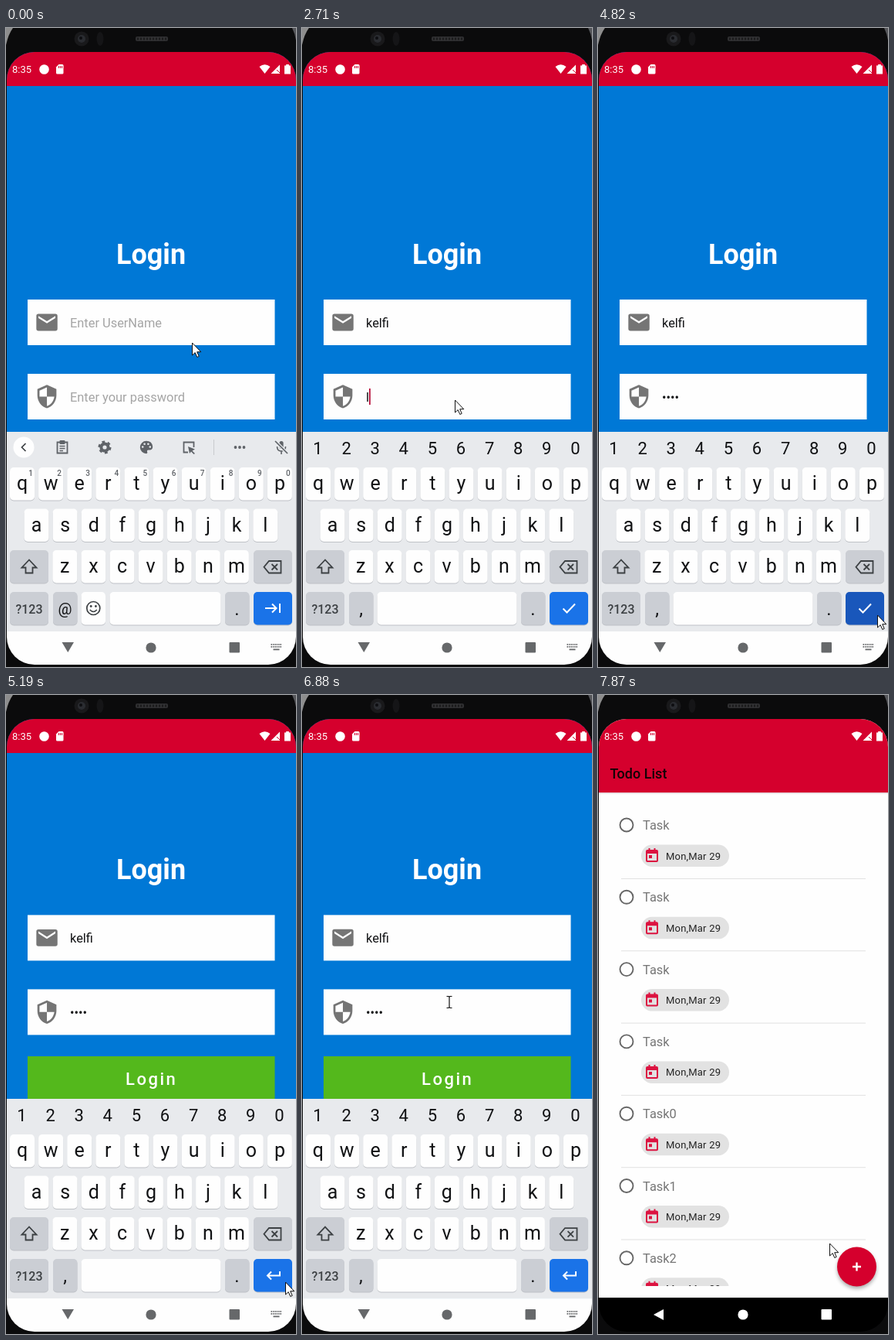
These frames come from a looping animation (376 by 826 pixels, 8000 ms). An HTML page:

```html
<!DOCTYPE html>
<html lang="en">
<head>
<meta charset="utf-8">
<title>Login to todo list</title>
<style>
html, body { margin: 0; width: 100%; height: 100%; overflow: hidden; background: #0b0b0c; }
svg { display: block; font-family: Roboto, sans-serif; }
text { white-space: pre; }
</style>
</head>
<body>
<svg id="stage" width="376" height="826" viewBox="0 0 376 826"></svg>
<script>
const LOOP = 8000, RED = '#d5002d', INK = '#111214', DARK = '#3c4043', GREY = '#5f6368';
const USER = 'kelfi';
const stage = document.getElementById('stage');
const pen = document.createElement('canvas').getContext('2d');

// Value of the last [time, value] step that has begun.
const at = (t, steps) => steps.reduce((v, s) => t >= s[0] ? s[1] : v, steps[0][1]);

const rect = (x, y, w, h, fill, r = 0) =>
  `<rect x="${x}" y="${y}" width="${w}" height="${h}" rx="${r}" fill="${fill}"/>`;
const dot = (x, y, r, fill) => `<circle cx="${x}" cy="${y}" r="${r}" fill="${fill}"/>`;
const ring = (x, y, r, color, w, extra = '') =>
  `<circle cx="${x}" cy="${y}" r="${r}" fill="none" stroke="${color}" stroke-width="${w}" ${extra}/>`;
const text = (x, y, str, size, fill = INK, extra = '') =>
  `<text x="${x}" y="${y}" font-size="${size}" fill="${fill}" ${extra}>${str}</text>`;
const mid = (x, y, str, size, fill = INK, extra = '') =>
  text(x, y, str, size, fill, `text-anchor="middle" ${extra}`);
const fill = (d, color, extra = '') => `<path d="${d}" fill="${color}" ${extra}/>`;
const line = (d, color = INK, w = 2) =>
  `<path d="${d}" fill="none" stroke="${color}" stroke-width="${w}"/>`;
const move = (x, y, s, body) => `<g transform="translate(${x} ${y}) scale(${s})">${body}</g>`;
const zoom = (s, body, alpha = 1) =>
  `<g opacity="${alpha}" transform="translate(188 427) scale(${s}) translate(-188 -427)">${body}</g>`;

const MAIL = 'M20 4H4a2 2 0 0 0-2 2v12a2 2 0 0 0 2 2h16a2 2 0 0 0 2-2V6a2 2 0 0 0-2-2zm0 4l-8 5-8-5V6l8 5 8-5z';
const SHIELD = 'M12 1L3 5v6c0 5.55 3.84 10.74 9 12 5.16-1.26 9-6.45 9-12V5zm0 11h7c-.53 4.12-3.28 7.8-7 8.94V12H5V6.3l7-3.1z';
const PALETTE = 'M0-8.2a8.2 8.2 0 0 0 0 16.4q2-.4 1-2.4-.6-2.2 1.4-2.2H4.2Q8.2 3.4 8.2-1 7.2-8.2 0-8.2z';

function body() {
  let grille = '';
  for (let x = 170; x < 209; x += 4) grille += rect(x, 12.5, 2, 3, '#1b1b1c');
  return rect(0, 0, 376, 826, '#0b0b0c') +
    fill('M0 0H9Q3 8 0 22z', '#8d8d8d') + fill('M376 0H371Q375 8 376 16z', '#55565a') +
    dot(98, 14, 9.5, '#19191b') + dot(98, 14, 5, '#2a2c31') + dot(97, 13, 2, '#0d0e11') +
    '<ellipse cx="122" cy="14" rx="4.5" ry="9" fill="#151517"/>' +
    rect(168, 11, 42, 6, '#303032', 2) + grille;
}

function statusIcons() {
  return text(8, 58, '8:35', 13, '#fff') + dot(49.5, 53.5, 6.3, '#fff') +
    fill('M68.5 47H73q1.5 0 1.5 1.5V58q0 1.5-1.5 1.5H66.5q-1.5 0-1.5-1.5V50.5z', '#fff') +
    line('M68.5 49v3M70.5 49v3M72.5 49v3', RED, 1) +
    fill('M328.5 50Q335.5 44.5 342.5 50L335.5 59z', '#fff') +
    fill('M355 47.5V59H343.5z', '#fff') + line('M351 54l4 4', RED, 1) +
    fill('M361 48.5h2.2V47h3.6v1.5H369V59.5h-8z', '#fff');
}

function field(y, icon, value, hint, showCaret, underlined = 0) {
  pen.font = '16.4px Roboto, sans-serif';
  const end = 83 + pen.measureText(value).width, baseline = y + 36;
  const marked = `<tspan text-decoration="underline">${value.slice(0, underlined)}</tspan>`;
  return rect(28, y, 320.5, 59, '#fefefe') +
    move(36.6, y + 13, 1.37, fill(icon, '#757575', 'fill-rule="evenodd"')) +
    (value ? text(83, baseline, (underlined ? marked : '') + value.slice(underlined), 16.4)
           : text(83, baseline, hint, 16.4, '#a5a5a5')) +
    (showCaret ? rect(end, y + 19, 1.8, 21, '#b8123c') : '');
}

const suggested = t => at(t, [[0, 0], [250, 1], [510, 2], [660, 3], [780, 4], [1290, 5]]);

function login(t) {
  const up = t >= 5190 ? 66.6 : 0;
  const user = USER.slice(0, at(t, [[0, 0], [120, 1], [250, 2], [370, 3], [510, 4], [1040, 5]]));
  const pass = at(t, [[0, ''], [2710, 'l'], [2860, '•o'], [2980, '••n'], [3100, '•••a'], [4580, '••••']]);
  const userCaret = at(t, [[0, 0], [120, 1], [1720, 0]]);
  const passCaret = at(t, [[0, 0], [2090, 1], [3630, 0], [4190, 1], [4700, 0]]);
  return rect(1, 31, 375, 750, '#0078d6') + rect(1, 31, 375, 44, RED) +
    `<g transform="translate(0 ${-up})">` +
    mid(188, 304.5, 'Login', 36, '#fff', 'font-weight="700"') +
    field(351, MAIL, user, 'Enter UserName', userCaret, t < 2090 ? suggested(t) : 0) +
    field(447, SHIELD, pass, 'Enter your password', passCaret) +
    rect(28, 533.6, 320.5, 60, '#54b81c') +
    text(155, 570.5, 'Login', 22, '#fff', 'font-weight="500" letter-spacing="2.5"') + '</g>' +
    keyboard(t) + rect(1, 780, 375, 43, '#fefefe');
}

function key(x, y, w, color, label = '') {
  return rect(x, y + 1, w, 42.5, '#bfc2c7', 5) + rect(x, y, w, 42.5, color, 5) + label;
}

function toolbar(t) {
  const open = t < 250;
  let out = dot(23, 542, 13.5, '#fefefe') +
    line(open ? 'M25.5 537l-5 5 5 5' : 'M20.5 537l5 5-5 5', DARK, 1.7);
  out += move(357, 542, 1, rect(-2.6, -8, 5.2, 10, GREY, 2.6) +
    line('M-5.5-1q0 6 5.5 6t5.5-6M0 5v4', GREY, 1.6) +
    line('M-8-8L8 8', '#e8eaed', 4) + line('M-8-8L8 8', GREY, 1.7));
  if (open) {
    out += move(73, 542, 1, line('M-6.5-6.5h13v14h-13z', GREY, 1.8) + rect(-3.5, -9, 7, 5, GREY, 1) +
      line('M-3.5-1.5h7M-3.5 1.5h7M-3.5 4.5h4.5', GREY, 1.4));
    out += move(128, 542, 1, ring(0, 0, 4.6, GREY, 4) + ring(0, 0, 7.3, GREY, 2.4, 'stroke-dasharray="3.82"'));
    out += move(182, 542, 1, fill(PALETTE, GREY) +
      [[-4.8, -.5], [-2.4, -4.3], [2.4, -4.3], [4.8, -.5]].map(p => dot(...p, 1.3, '#e8eaed')).join(''));
    out += move(237, 542, 1, line('M-1 6.5H-6.5V-6.5H6.5V0', GREY, 1.8) +
      fill('M-1-1L8 2.5 4.5 4.5 8 8 6.5 9 3 5.5 1 8z', GREY));
    out += rect(269, 532, 1, 20, '#c8cacd') + [297.5, 303, 308.5].map(x => dot(x, 542, 1.9, GREY)).join('');
  } else {
    out += mid(83, 548, USER.slice(0, suggested(t)), 16, '#4a4d51') +
      mid(187, 537.5, USER + 'rona27', 14.5, DARK, 'font-weight="500"') +
      mid(187, 553, '@qovel.co', 11, '#4a4d51') +
      rect(132, 531, 1, 22, '#c8cacd') + rect(242, 531, 1, 22, '#c8cacd');
  }
  return out;
}

function keyboard(t) {
  const secret = t >= 2210, pitch = 37.1, soft = '#cbced4', white = '#fefefe';
  let out = rect(1, 522, 375, 258, '#e8eaed');
  const row = (letters, x, y) => [...letters].forEach((c, i) => {
    const cx = x + i * pitch;
    out += key(cx - 16, y, 32, white, mid(cx, y + 29, c, 25));
  });
  if (!secret) out += toolbar(t);
  row('qwertyuiop', 21, 568);
  row('asdfghjkl', 39.5, 621.5);
  row('zxcvbnm', 76.3, 675);
  [...'1234567890'].forEach((d, i) => {
    out += secret ? mid(20.5 + i * pitch, 551, d, 22)
      : mid(32 + i * pitch, 579, d, 10, GREY, 'font-weight="500"');
  });
  out += key(5, 675, 50, soft, line('M30 687.5l-9.5 10h5v7h9v-7h5z', DARK, 1.8)) +
    key(321, 675, 50, soft, line('M341 689h15.5v15.5H341l-6.5-7.75zM344.5 693l7.5 7.5M352 693l-7.5 7.5', DARK, 1.8)) +
    key(5, 729, 50, soft, mid(30, 756.5, '?123', 16, DARK, 'font-weight="500"')) +
    key(61, 729, 31.5, soft, secret ? mid(76.5, 759, ',', 24) : mid(76.5, 758, '@', 20));
  if (secret) out += key(97.5, 729, 181, white);
  else out += key(97.5, 729, 31.5, white, ring(113.3, 750, 8.5, DARK, 1.7) +
      dot(110.2, 747.5, 1.4, DARK) + dot(116.4, 747.5, 1.4, DARK) +
      line('M108.8 752q4.5 5 9 0', DARK, 1.6)) + key(134.5, 729, 144, white);
  const action = !secret ? 'M336 750h14M345 744.5l5.5 5.5-5.5 5.5M355 744v12'
    : t < 5190 ? 'M338.5 750.5l5 5 10.5-11' : 'M355 745v5.5H339M344 745.5l-5 5 5 5';
  out += key(284, 729, 31.5, soft, mid(299.5, 759, '.', 24)) +
    key(321, 729, 50, t >= 4820 && t < 5190 ? '#1957bb' : '#1a73e8', line(action, '#fff', 2));
  return out;
}

function navIcons(t) {
  const dark = t >= 7240, c = dark ? '#fff' : '#66686a';
  let out = fill(dark ? 'M85 794v14l-13-7z' : 'M72.5 794h15.5l-7.75 13z', c) +
    dot(188, 801, 6.6, c) + rect(289.5, 794, 13.5, 13.5, c, 1);
  if (!dark) {
    for (let i = 0; i < 12; i++) out += rect(343.5 + i % 6 * 2.4, 796 + (i / 6 | 0) * 3, 1.5, 1.8, c);
    out += rect(346.5, 802.5, 8, 1.8, c);
  }
  return out;
}

function task(name, i) {
  return move(0, i * 93.3, 1, ring(37, 168, 8.5, '#666', 1.9) + text(58, 174, name, 16.4, '#757575') +
    rect(56, 193.5, 114, 28.5, '#e2e2e2', 14.25) +
    fill('M64 200h1.5v-2h2v2h5v-2h2v2H76q2 0 2 2v12q0 2-2 2H64q-2 0-2-2V202q0-2 2-2zM64 205v9h12v-9zM66 207h4v4h-4z',
      '#dc1340', 'fill-rule="evenodd"') +
    text(88, 212.5, 'Mon,Mar 29', 13, '#222', 'letter-spacing=".2"') + rect(30, 237, 317, 1, '#e2e2e2'));
}

function todo(t) {
  const tasks = ['Task', 'Task', 'Task', 'Task', 'Task0', 'Task1', 'Task2'];
  return rect(1, 31, 375, 748, '#fefefe') + rect(1, 126, 375, 1.5, '#e4d5d8') + rect(1, 31, 375, 95, RED) +
    text(15.5, 108, 'Todo List', 18, '#120306', 'font-weight="500"') +
    (t >= 7240 ? `<g clip-path="url(#list)">${tasks.map(task).join('')}</g>` : '') +
    '<circle cx="335.5" cy="742" r="25.5" fill="#000" opacity=".32" filter="url(#blur)"/>' +
    dot(335.5, 739, 25.5, RED) + line('M335.5 733.5v11M330 739h11', '#fff', 2.4) +
    rect(1, 779, 375, 44, '#000');
}

function pointer(t) {
  if (t >= 6630 && t < 7600) {
    return move(191, 397, 1, line('M-3.5-7.5h2.5l1 1 1-1h2.5M0-7V7M-3.5 7.5h2.5l1-1 1 1h2.5', '#111', 1.2));
  }
  const [x, y] = at(t, [[0, [241, 407]], [1600, [233, 426]], [1720, [213, 456]], [1840, [198, 481]],
    [4190, [270, 664]], [4340, [345, 742]], [4460, [362, 759]], [5320, [276, 621]],
    [5470, [240, 479]], [5610, [239, 479]], [6510, [170, 415]], [7600, [165, 519]],
    [7750, [242, 632]], [7870, [300, 709]]]);
  return move(x + .5, y, 1, fill('M0 0V16L3.7 12.6 6.3 18.5 8.7 17.4 6.2 11.7H11.3z', '#fff', 'stroke="#111"'));
}

// Fast start, very slow settling.
const settle = p => p < 1 / 6 ? 86.4 * p ** 3 : 1 - .6 * ((1 - p) * 1.2) ** 7;

function screen(t) {
  if (t < 6880) return login(t);
  if (t >= 7240) return todo(t);
  const elapsed = at(t, [[6880, 12], [7000, 132], [7120, 252]]);
  const k = settle(elapsed / 400);
  const alpha = Math.min(1, Math.max(0, (elapsed - 35) / 50));
  return zoom(1 + .05 * k, login(t)) +
    `<g opacity="${.2 * k}">${rect(0, 31, 376, 792, '#000')}</g>` +
    zoom(.85 + .15 * k, todo(t), alpha);
}

function scene(t) {
  return `<defs><clipPath id="screen">${rect(1, 31, 375, 792, '#000', 36)}</clipPath>
    <clipPath id="list">${rect(1, 127, 375, 637, '#000')}</clipPath>
    <filter id="blur"><feGaussianBlur stdDeviation="2.5"/></filter></defs>` +
    body() + `<g clip-path="url(#screen)">${screen(t)}${statusIcons()}${navIcons(t)}</g>` + pointer(t);
}

let shown = '';
function frame() {
  const next = scene(performance.now() % LOOP);
  if (next !== shown) stage.innerHTML = shown = next;
  requestAnimationFrame(frame);
}
frame();
</script>
</body>
</html>
```
